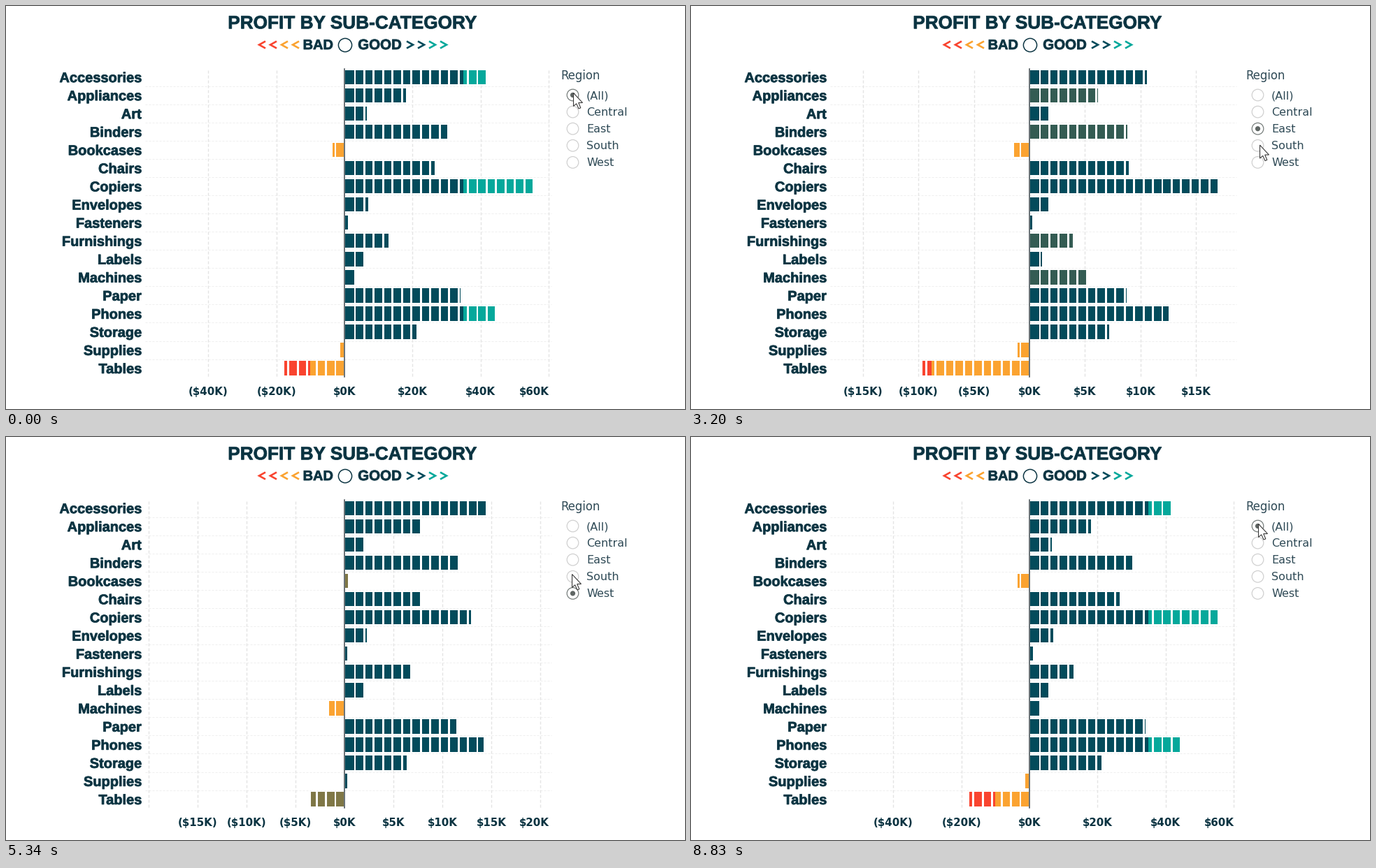
Write a matplotlib script that moves like this. It is 971 by 577 pixels and loops after 8960 ms.

```python
import numpy as np
import matplotlib.pyplot as plt
from matplotlib.animation import FuncAnimation
from matplotlib.collections import LineCollection, PolyCollection
from matplotlib.patches import Circle, PathPatch, Polygon
from matplotlib.textpath import TextPath
from matplotlib.transforms import Affine2D

W, H, DPI = 971, 577, 64
PT = 72 / DPI  # points per pixel
LOOP, STEP = 8960, 40

INK, SOFT = "#0a3341", "#2f4a56"
NAVY, ORANGE, RED, TEAL = (np.array(plt.matplotlib.colors.to_rgb(c)) for c in (
    "#034b5b", "#fba331", "#f9442f", "#05a89b"))

ZERO, REACH = 483.5, 270.5   # x of the $0K axis, length of the longest bar
TOP, PITCH, BAR = 101.3, 26.05, 20.4
CELL, GAP = 13.46, 2.9       # pitch of the bar slices and the space between
LOW, HIGH = -10, 35          # colour limits in $K
MOVE, TRAVEL, PRESS = 1000, 1200, 190   # ms

# profit in $K for Central, East, South, West
PROFIT = {
    "Accessories": (7.25, 11.2, 7, 16.48),
    "Appliances": (-2.64, 8.39, 4.12, 8.26),
    "Art": (1.2, 1.9, 1.06, 2.37),
    "Binders": (-1.04, 11.27, 3.9, 16.1),
    "Bookcases": (-2, -1.17, 1.34, -1.65),
    "Chairs": (6.59, 9.36, 6.61, 4.03),
    "Copiers": (15.61, 17.02, 3.66, 19.33),
    "Envelopes": (1.72, 1.81, 1.47, 1.91),
    "Fasteners": (0.24, 0.26, 0.17, 0.28),
    "Furnishings": (-3.91, 5.88, 3.44, 7.64),
    "Labels": (1.07, 1.13, 1.04, 2.3),
    "Machines": (-1.49, 6.93, -1.44, -0.62),
    "Paper": (6.97, 9.02, 5.95, 12.12),
    "Phones": (12.32, 12.31, 10.77, 9.11),
    "Storage": (1.97, 8.39, 2.27, 8.65),
    "Supplies": (-0.66, -1.16, 0, 0.63),
    "Tables": (-3.56, -11.03, -4.62, 1.48),
}
REGIONS = ["(All)", "Central", "East", "South", "West"]
parts = np.array(list(PROFIT.values())).T
VALUES = np.vstack([parts.sum(axis=0), parts])   # one row per region
SCALES = REACH / VALUES.max(axis=1)              # pixels per $K

# time of each choice, region index, pointer position
PICKS = [(280, 0, (811, 124)), (1075, 1, (808, 143)), (2505, 2, (813, 175)),
         (3690, 3, (813, 203)), (4840, 4, (811, 227)), (6300, 2, (808, 180)),
         (7660, 0, (811, 124))]
ARROW = np.array([(0, 0), (0, 19), (4.2, 15.3), (7.5, 22.5), (10.3, 21.3),
                  (7.2, 14), (13, 14)])

fig = plt.figure(figsize=(W / DPI, H / DPI), dpi=DPI, facecolor="white")
ax = fig.add_axes([0, 0, 1, 1])
# whole numbers fall on pixel centres
ax.set_xlim(-0.5, W - 0.5)
ax.set_ylim(H - 0.5, -0.5)
ax.axis("off")


def heavy(text, x, y, size, align=0.5):
    """Extra bold text; align is 0 left, 0.5 centre, 1 right."""
    path = TextPath((0, 0), text, size=size,
                    prop={"family": "Liberation Sans", "weight": "bold"})
    box = path.get_extents()
    place = Affine2D().scale(1, -1).translate(
        x - box.x0 - align * box.width, y)
    ax.add_patch(PathPatch(path, fc=INK, ec=INK, lw=0.8 * PT,
                           transform=place + ax.transData))


def row_y(i):
    return TOP + PITCH * i


def radio_y(i):
    return 127 + 24.1 * i


def chevron(x, way, color):
    ax.plot([x - 4.5 * way, x + 4.5 * way, x - 4.5 * way], [50, 55, 60],
            color=color, lw=2.6 * PT, solid_joinstyle="miter",
            solid_capstyle="butt")


def draw_static():
    heavy("PROFIT BY SUB-CATEGORY", 495.5, 31.8, 26.2)
    heavy("BAD", 446, 61.5, 20)
    heavy("GOOD", 534, 61.5, 20.5)
    ax.add_patch(Circle((484.5, 55.5), 9.6, fc="none", ec=INK, lw=1.5 * PT))
    for k, (left, right) in enumerate([(RED, NAVY)] * 2 + [(ORANGE, TEAL)] * 2):
        chevron(366 + 16 * k, -1, left)
        chevron(577 + 16 * k, 1, right)
    for i, name in enumerate(PROFIT):
        heavy(name, 193, row_y(i) + 7.3, 20, 1)
    rows = [[(198, row_y(i + 0.5)), (779, row_y(i + 0.5))]
            for i in range(len(PROFIT) - 1)]
    ax.add_collection(LineCollection(rows, colors="#efefef", lw=PT,
                                     linestyles=(0, (3, 2)), zorder=0.5))
    ax.plot([ZERO, ZERO], [89, 530], color="#3c474c", lw=1.5 * PT, zorder=4)
    style = dict(family="DejaVu Sans", color=SOFT)
    ax.text(793, 104.5, "Region", size=16.5 * PT, **style)
    for i, name in enumerate(REGIONS):
        ax.text(829.5, radio_y(i) + 5.5, name, size=16 * PT, **style)


draw_static()
grid = LineCollection([], colors="#e4e4e4", lw=1.4 * PT,
                      linestyles=(0, (3, 2)), zorder=0.6)
bars = PolyCollection([], linewidths=0, zorder=3)
ax.add_collection(grid)
ax.add_collection(bars)
labels = [ax.text(0, 556.7, "", family="DejaVu Sans", weight="bold",
                  size=15 * PT, color=INK, ha="center") for _ in range(9)]
rings = [ax.add_patch(Circle((810, radio_y(i)), 8.3, fc="white", lw=1.2 * PT))
         for i in range(len(REGIONS))]
dot = ax.add_patch(Circle((810, 127), 3.6, fc="#5f6664", lw=0, zorder=4))
halo = ax.add_patch(Circle((0, 0), 16.5, fc="#808080", alpha=0.12, lw=0,
                           zorder=5))
pointer = ax.add_patch(Polygon(ARROW, fc="white", ec="#3a3a3a", lw=1.1 * PT,
                               zorder=6))


def ends(region):
    """Pixel ends of the normal part and of the whole bar."""
    values, scale = VALUES[region], SCALES[region]
    return np.array([ZERO + scale * np.clip(values, LOW, HIGH),
                     ZERO + scale * values])


def tones(region):
    return np.where(VALUES[region][:, None] >= 0, NAVY, ORANGE)


def ticks(region):
    """Values and places of the gridlines that fit the plot."""
    step = 5 if VALUES[region].max() < 20 else 20
    places = [(v, ZERO + SCALES[region] * v)
              for v in range(-4 * step, 5 * step, step)]
    return [(v, x) for v, x in places if 202 < x < 778]


def slices(a, b, y):
    lo, hi = min(a, b), max(a, b)
    for k in range(-21, 21):
        # the axis widens the first slice on its right
        left = 486.5 + CELL * k - (1.9 if k == 0 else 0 if k > 0 else 1.1)
        right = 486.5 + CELL * (k + 1) - GAP - (1.1 if k < 0 else 0)
        x0, x1 = max(lo, left), min(hi, right)
        if x1 - x0 > 0.4:
            yield [(x0, y - BAR / 2), (x1, y - BAR / 2),
                   (x1, y + BAR / 2), (x0, y + BAR / 2)]


def set_bars(old, new, part):
    base, tip = ends(old) + (ends(new) - ends(old)) * part
    color = tones(old) + (tones(new) - tones(old)) * part
    polys, fills = [], []
    for i in range(len(PROFIT)):
        extra = RED if tip[i] < ZERO else TEAL
        for a, b, tone in ((ZERO, base[i], color[i]), (base[i], tip[i], extra)):
            found = list(slices(a, b, row_y(i)))
            polys += found
            fills += [tone] * len(found)
    bars.set_verts(polys)
    bars.set_facecolor(fills)


def set_labels(region):
    for label in labels:
        label.set_text("")
    shown = [p for p in ticks(region) if p[1] > 215]
    for label, (value, x) in zip(labels, shown):
        label.set_text(f"(${-value}K)" if value < 0 else f"${value}K")
        label.set_x(np.clip(x, 231, 755))


def set_pointer(t, now):
    start, _, here = PICKS[now]
    later, _, there = PICKS[min(now + 1, len(PICKS) - 1)]
    u = np.clip((t - start) / min(TRAVEL, max(later - start, 1)), 0, 1)
    spot = np.array(here) + np.subtract(there, here) * (1 - (1 - u) ** 2)
    pointer.set_xy(ARROW + spot)
    halo.center = spot
    halo.set_visible(0 < later - t < PRESS)


def update(frame):
    t = frame * STEP + STEP / 2
    now = max(sum(start <= t for start, *_ in PICKS) - 1, 0)
    start, new, _ = PICKS[now]
    old = PICKS[max(now - 1, 0)][1]
    u = np.clip((t - start) / MOVE, 0, 1)
    set_bars(old, new, u * u * (3 - 2 * u))
    set_labels(new)
    # gridlines jump just after the labels do
    lines = ticks(new if u > 0.04 else old)
    grid.set_segments([[(x, 91), (x, 530)] for v, x in lines if v])
    for i, ring in enumerate(rings):
        ring.set_edgecolor("#737a78" if i == new else "#cfcfcf")
    dot.center = (810, radio_y(new))
    set_pointer(t, now)
    return []


anim = FuncAnimation(fig, update, frames=LOOP // STEP, interval=STEP,
                     repeat=True, repeat_delay=0, init_func=lambda: [])
plt.show()
```
